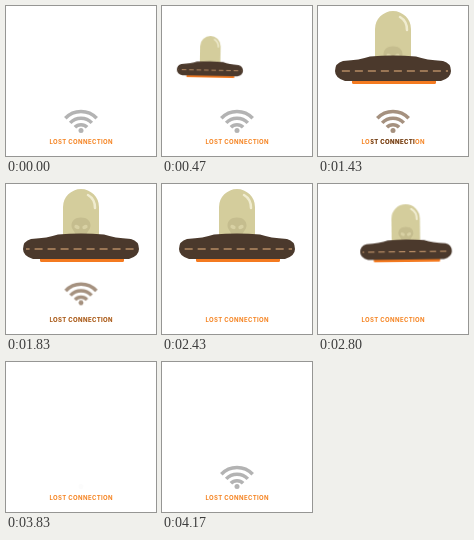
Write an HTML page that moves like this. It is 150 px wide and 150 px high and loops after 4.41 s.

```html
<!DOCTYPE html>
<html lang="en">
<head>
<meta charset="utf-8">
<title>Lost connection</title>
<style>
html, body { margin: 0; width: 100%; height: 100%; overflow: hidden; background: #fff; }
svg { display: block; width: 100vw; height: 100vh; }
svg * { animation: 4410ms linear infinite; }

text { font: 700 6px Inter, "Open Sans", sans-serif; letter-spacing: .35px; text-anchor: middle; fill: #f5821f; }
.tint { fill: #50392a; animation-name: tint; }
.beam { transform-origin: 75px 135px; animation-name: beam; }
.wifi { fill: none; stroke: #b3b3b3; stroke-width: 3.5; transform-origin: 75px 116px; animation-name: lift; }
.bar1 { animation-name: bar1; }
.bar2 { animation-name: bar2; }
.bar3 { animation-name: bar3; }
.dot { fill: #b3b3b3; stroke: none; animation-name: dot; }
.ship { animation-name: fly; }
.alien { animation-name: peek; }
.dashes { fill: none; stroke: #b58a63; stroke-width: 1.7; stroke-dasharray: 8 5; animation-name: spin; }

/* enter from the left, hover, leave to the right */
@keyframes fly {
  0%, 1.58% { transform: translate(38px, 31px) scale(0); }
  3.4% { transform: translate(25px, 38px) scale(.12) rotate(4deg); }
  5.67% { transform: translate(26px, 48px) scale(.25) rotate(4deg); }
  9.07% { transform: translate(39px, 60px) scale(.47) rotate(2deg); }
  12.93% { transform: translate(60.5px, 66px) scale(.71); }
  18.14% { transform: translate(72px, 63px) scale(.91); animation-timing-function: ease-out; }
  24.5%, 58.3% { transform: translate(75px, 62px) scale(1); }
  61.9% { transform: translate(82px, 66px) scale(.89); }
  66.44% { transform: translate(99px, 64px) scale(.61) rotate(-2deg); }
  70.98% { transform: translate(116.5px, 54.5px) scale(.3) rotate(-2deg); }
  74.15% { transform: translate(110px, 43px) scale(.17) rotate(-4deg); }
  77.1% { transform: translate(86px, 35px) scale(.02); }
  77.2%, 100% { transform: translate(86px, 35px) scale(0); }
}
@keyframes peek {
  0%, 25% { transform: translateY(20px); animation-timing-function: ease-in-out; }
  37.5%, 100% { transform: none; }
}
@keyframes spin { to { stroke-dashoffset: -52px; } }

@keyframes lift {
  0%, 25.6% { transform: none; stroke: #b3b3b3; }
  31.5% { stroke: #a5917f; }
  35.8% { transform: none; animation-timing-function: cubic-bezier(.33, 0, .67, .33); }
  54.6% { transform: translateY(-60px) scale(.75); stroke: #a5917f; }
  54.7%, 100% { transform: none; stroke: #b3b3b3; }
}
@keyframes dot {
  0%, 25.6% { fill: #b3b3b3; opacity: 1; }
  31.5%, 54.5% { fill: #a5917f; opacity: 1; }
  54.6%, 86.8% { fill: #b3b3b3; opacity: 0; }
  89%, 100% { fill: #b3b3b3; opacity: 1; }
}
@keyframes bar1 { 0%, 54.5% { opacity: 1; } 54.6%, 88.4% { opacity: 0; } 90.6%, 100% { opacity: 1; } }
@keyframes bar2 { 0%, 54.5% { opacity: 1; } 54.6%, 90% { opacity: 0; } 92.4%, 100% { opacity: 1; } }
@keyframes bar3 { 0%, 54.5% { opacity: 1; } 54.6%, 92% { opacity: 0; } 94.5%, 100% { opacity: 1; } }

@keyframes beam {
  0%, 25.6% { transform: scaleX(0); }
  32.4% { transform: scaleX(.64); }
  41.5%, 46% { transform: scaleX(.93); }
  54%, 100% { transform: scaleX(0); }
}
@keyframes tint {
  0%, 32.4% { opacity: .9; }
  41.5%, 100% { opacity: .5; }
}
</style>
</head>
<body>
<svg viewBox="0 0 150 150">
  <clipPath id="cone"><rect class="beam" x="42" y="128" width="66" height="14"/></clipPath>

  <text x="75.2" y="137.5">LOST CONNECTION</text>
  <g clip-path="url(#cone)"><text class="tint" x="75.2" y="137.5">LOST CONNECTION</text></g>

  <g class="wifi">
    <path class="bar3" d="M59.3 112.3A21.5 21.5 0 0 1 90.7 112.3"/>
    <path class="bar2" d="M64.2 116.9A14.8 14.8 0 0 1 85.800 116.9"/>
    <path class="bar1" d="M68.9 121.3A8.3 8.3 0 0 1 81.1 121.3"/>
    <circle class="dot" cx="75" cy="124.6" r="2.5"/>
  </g>

  <g class="ship">
    <g transform="translate(-75 -62)">
      <path fill="#d4cd9c" d="M57 56V23a18 18 0 0 1 36 0V56Z"/>
      <g class="alien">
        <path fill="#c5bd8e" d="M75 33.5c6 0 9.5 3.5 9.5 8 0 4-3 5-4 9h-11c-1-4-4-5-4-9 0-4.5 3.5-8 9.5-8Z"/>
        <g fill="#d8d1a4">
          <ellipse cx="71" cy="43" rx="2.8" ry="2" transform="rotate(25 71 43)"/>
          <ellipse cx="79" cy="43" rx="2.8" ry="2" transform="rotate(-25 79 43)"/>
        </g>
      </g>
      <path fill="none" stroke="#f0ecd0" stroke-width="2.5" stroke-linecap="round" d="M82 11Q89 15 89 24"/>
      <rect fill="#f47a20" x="34" y="72" width="84" height="6" rx="1.5"/>
      <path fill="#4b392c" d="M25 55Q42 54 52 50.5Q75 48.5 98 50.5Q108 54 125 55Q133 57 133 65Q133 72 123 75H27Q17 72 17 65Q17 57 25 55Z"/>
      <path class="dashes" d="M20 65H130"/>
    </g>
  </g>
</svg>
</body>
</html>
```
